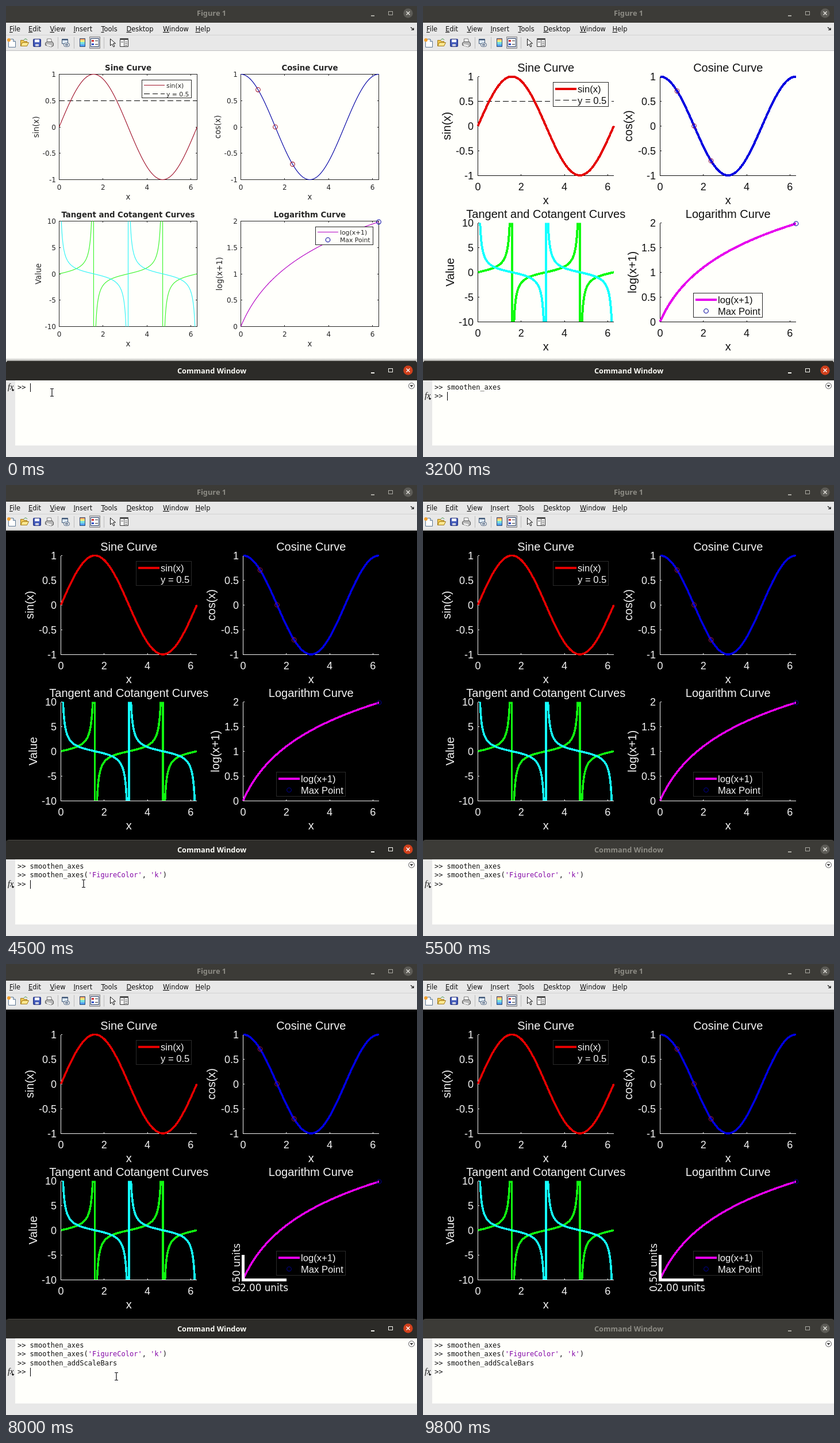
Animation, 715 px wide and 783 px high, one loop 9.9 s. Source, as an HTML page:

```html
<!DOCTYPE html>
<html lang="en">
<head>
<meta charset="utf-8">
<title>Figure 1</title>
<style>
html, body { margin: 0; width: 100%; height: 100%; overflow: hidden; background: #e8e8e8; }
svg { display: block; }
text { white-space: pre; }
.crisp { shape-rendering: crispEdges; }
.bar text { font: 700 12.8px "Noto Sans", sans-serif; text-anchor: middle; }
.bar { --face: #3c3b37; --label: #8c8b84; --glyph: #a9a8a1; --close: #5d5c57; --cross: #e4e3dd; }
.bar.active { --face: #2c2b28; --label: #fbfbf6; --glyph: #f4f4ee; --close: #d0401c; --cross: #fff; }
.menu { font: 11.4px "DejaVu Sans", sans-serif; fill: #111; }
.console { font: 12px "DejaVu Sans Mono", monospace; fill: #111; }
.console .str { fill: #8408a8; }
.fx { font: italic 14px "Liberation Serif", serif; }

.scene { --ink: #262626; --edge: #262626; --paper: #fffffb; --thick: 1.15px; --steep: 1.15px;
  --red: #a0142c; --blue: #0000a4; --green: #3cf52c; --cyan: #30f4f8; --pink: #b400c4; --mark: #a0142c; --spot: #0000a0; }
.pretty { --ink: #101010; --thick: 4px; --steep: 4px;
  --red: #e40000; --blue: #0000e0; --green: #10fa10; --cyan: #14ffff; --pink: #e600ee; --mark: #8c1450; }
.dark { --ink: #f4f4f4; --edge: #2a2a2a; --paper: #000; --thick: 3.6px; --steep: 3.6px; --spot: #00008c; }
.scene text { font-family: "DejaVu Sans", sans-serif; fill: var(--ink); }
.pretty text { font-family: "Liberation Sans", Arial, sans-serif; }
.scene .title, .scene .label { font-size: 13.33px; text-anchor: middle; }
.scene .title { font-weight: 700; }
.scene .tick { font-size: 12px; }
.scene .key { font-size: 10.8px; }
.pretty .title, .pretty .label { font-size: 20px; font-weight: 400; }
.pretty .tick { font-size: 18px; }
.pretty .key { font-size: 16.6px; }
.scene .scale { font: 16.8px "DejaVu Sans", sans-serif; }
.axis { fill: none; stroke: var(--ink); shape-rendering: crispEdges; }
.curve { fill: none; stroke-width: var(--thick); stroke-linejoin: round; }
.pretty .curve { shape-rendering: crispEdges; }
.steep { stroke-width: var(--steep); }
.dash { stroke: #000; stroke-dasharray: 9.5 5; shape-rendering: crispEdges; }
.ring { fill: none; stroke-width: 1.1; }
.legend { fill: var(--paper); stroke: var(--edge); shape-rendering: crispEdges; }
</style>
</head>
<body>
<svg id="stage" width="715" height="783" viewBox="0 0 715 783">
  <defs>
    <g id="buttons" fill="none">
      <path class="crisp" d="M635 17h6" stroke="var(--glyph)" stroke-width="2"/>
      <rect class="crisp" x="665.5" y="9.5" width="7" height="6" stroke="var(--glyph)"/>
      <circle cx="699.5" cy="12.5" r="8.2" fill="var(--close)"/>
      <path d="M696.5 9.5l6 6m0-6l-6 6" stroke="var(--cross)" stroke-width="1.4"/>
    </g>
    <linearGradient id="shade" x2="0" y2="1">
      <stop stop-color="#000" stop-opacity="0"/><stop offset="1" stop-color="#000" stop-opacity=".3"/>
    </linearGradient>
  </defs>

  <rect y="78" width="715" height="1" fill="#fffffb"/>
  <rect id="paper" y="79" width="715" height="540" fill="#fffffb"/>
  <g id="plots"></g>

  <rect y="28" width="715" height="50" fill="#e8e8e8"/>
  <g class="bar">
    <rect width="715" height="29" fill="var(--face)"/>
    <text x="357.5" y="17" fill="var(--label)">Figure 1</text>
    <use href="#buttons"/>
  </g>
  <path class="crisp" d="M0 50.5h715" stroke="#d2d2d2"/>
  <path class="crisp" d="M0 77.5h715" stroke="#c0c0c0"/>
  <g id="menu" class="menu"></g>
  <path d="M704 37l5 4m0-3v3.5h-4" fill="none" stroke="#111" stroke-width="1.2"/>

  <g id="tools" stroke-linejoin="round">
    <path class="crisp" d="M90.5 54v20M118.5 54v20M170.5 54v20" stroke="#bcbcbc"/>
    <path d="M4.5 57.5h8l4 4v10h-12z" fill="#fff" stroke="#5e7894"/>
    <path d="M12.5 57.5v4h4" fill="#dbe6f0" stroke="#5e7894"/>
    <circle cx="5" cy="59" r="3" fill="#f0a030"/>
    <path d="M25.5 69.5v-10h5l1 2h5v8z" fill="#f0c850" stroke="#a07818"/>
    <path d="M25.5 69.5l3-6h11l-3 6z" fill="#ffe890" stroke="#a07818"/>
    <path d="M31 59q3-4 6 0" fill="none" stroke="#409040"/>
    <rect x="47.5" y="57.5" width="13" height="13" rx="1" fill="#4058b8" stroke="#202c78"/>
    <path d="M50 58h8v5h-8z" fill="#f2f4ff"/><path d="M51 66h6v4h-6z" fill="#c8cce0"/>
    <path d="M71.5 63v-6h7l1 6" fill="#fff" stroke="#777"/>
    <path d="M68.5 64l3-2h9l2 3v4l-4 2-10-3z" fill="#b8b8b8" stroke="#555"/>
    <path d="M71 66l8 2v3l-8-2z" fill="#eee"/>
    <path d="M97.5 57.5h10v8h-10z" fill="#dce8f4" stroke="#405878"/>
    <path d="M97.5 58.5h10" stroke="#405878" stroke-width="2"/>
    <rect x="100.5" y="64.5" width="10" height="6" rx="3" fill="#f4f4f4" stroke="#405878"/>
    <path d="M103 67.5h5" stroke="#405878" stroke-width="2"/>
    <path d="M128.5 56.5h9v3h-9z" fill="#f0a060"/><path d="M128.5 59.5h9v3h-9z" fill="#f4f070"/>
    <path d="M128.5 62.5h9v4h-9z" fill="#70e0e0"/><path d="M128.5 66.5h9v4h-9z" fill="#50a0f0"/>
    <rect x="128.5" y="56.5" width="9" height="14" fill="none" stroke="#304870"/>
    <rect x="145.5" y="53.5" width="18" height="20" fill="#cfcfd4" stroke="#858585"/>
    <rect x="147.5" y="56.5" width="14" height="14" fill="#fff" stroke="#304870"/>
    <path d="M149 60.5h4" stroke="#d03030" stroke-width="3"/><path d="M149 66.5h4" stroke="#3050c8" stroke-width="3"/>
    <path d="M155 60.5h5m-5 6h5" stroke="#333"/>
    <path d="M181.5 57v12l3-3 2.5 5 2-1-2.5-5h4z" fill="#fff" stroke="#111"/>
    <rect x="198.5" y="56.5" width="14" height="14" fill="#fff" stroke="#333"/>
    <path d="M198 58h15" stroke="#555" stroke-width="2"/>
    <path d="M205.5 59v11M207 62.5h4m-4 3h4m-4 3h4M200 62.5h4" stroke="#555"/>
  </g>

  <rect id="glow" y="611" width="715" height="5" fill="url(#shade)"/>
  <rect y="650" width="715" height="133" fill="#e8e8e8"/>
  <rect x="16" y="650" width="699" height="113" fill="#fffffb"/>
  <g id="command" class="bar">
    <path d="M0 650v-30q0-4 4-4h707q4 0 4 4v30z" fill="var(--face)"/>
    <path class="crisp" d="M4 616.5h707" stroke="#4a4944"/>
    <text x="358" y="638" fill="var(--label)">Command Window</text>
    <use href="#buttons" y="620"/>
  </g>
  <circle cx="705.5" cy="659.5" r="5" fill="#fff" stroke="#555"/>
  <path d="M702.5 658h6l-3 4z" fill="#444"/>

  <g id="console" class="console">
    <g id="fx"><text class="fx" x="3" y="666">fx</text><path d="M9.5 666h5l-2.5 3z"/></g>
  </g>
  <path id="caret" class="crisp" d="M.5 654.5v15" stroke="#000"/>
  <g id="beam" fill="none">
    <path d="M-3-6.5h6M0-6.5v13M-3 6.5h6" stroke="#fff" stroke-width="3"/>
    <path d="M-3-6.5h2.5L0-6 .5-6.5H3M0-6v12M-3 6.5h2.5L0 6l.5.5H3" stroke="#111" stroke-width="1.2"/>
  </g>
  <path id="arrow" d="M0 0v14l3.5-3 2.5 5.5 2.5-1-2.5-5.5h4.5z" fill="#000" stroke="#fff"/>
</svg>
<script>
const NS = 'http://www.w3.org/2000/svg', TAU = 2 * Math.PI, LOOP = 9900;
const $ = id => document.getElementById(id);

function add(parent, tag, attrs = {}, content = '') {
  const el = parent.appendChild(document.createElementNS(NS, tag));
  for (const k in attrs) el.setAttribute(k, attrs[k]);
  el.textContent = content;
  return el;
}
const show = (el, on) => el.setAttribute('visibility', on ? 'visible' : 'hidden');

const cot = x => 1 / Math.tan(x);
const panels = [
  { title: 'Sine Curve', name: 'sin(x)', lo: -1, hi: 1, step: .5, curves: [['red', Math.sin]], level: .5 },
  { title: 'Cosine Curve', name: 'cos(x)', lo: -1, hi: 1, step: .5, curves: [['blue', Math.cos]],
    rings: [1, 2, 3].map(k => k * TAU / 8), ring: 'mark' },
  { title: 'Tangent and Cotangent Curves', name: 'Value', lo: -10, hi: 10, step: 5, steep: true,
    curves: [['green', Math.tan], ['cyan', cot]] },
  { title: 'Logarithm Curve', name: 'log(x+1)', lo: 0, hi: 2, step: .5, curves: [['pink', Math.log1p]],
    rings: [TAU], ring: 'spot' }
];

const plain = { cls: 'scene', x: [92.5, 408.5], w: 240, y: [118.5, 373.5], h: 183, boxed: true,
  titleUp: 6.5, tickDown: 17, nameDown: 34.5, tickLeft: 5.5, mid: 4.5, names: [57, 373, 61, 375.5],
  keyMid: 4, sample: 36,
  keys: [{ x: 236.5, y: 128.5, w: 86, h: 31, rows: [137.5, 152.5], line: 240, text: 279 },
         { x: 538.5, y: 383.5, w: 100, h: 31, rows: [392.5, 406], line: 542, text: 581 }] };
const pretty = { cls: 'scene pretty', x: [95.5, 412.5], w: 236.5, y: [122.5, 376.5], h: 171.5,
  titleUp: 8.5, tickDown: 25.5, nameDown: 49.5, tickLeft: 7.5, mid: 6.5, names: [47.5, 363.5, 53.5, 370.5],
  keyMid: 6, sample: 37,
  keys: [{ x: 226.5, y: 132.5, w: 96, h: 42, rows: [144, 163.5], line: 229.5, text: 269 },
         { x: 470.5, y: 498.5, w: 120, h: 42, rows: [510, 529.5], line: 474, text: 513 }] };

function curvePath(f, px, py) {
  const n = 1000, pts = [];
  for (let i = 0; i < n; i++) {
    const x = TAU * i / (n - 1), y = Math.max(-40, Math.min(40, f(x)));
    pts.push(px(x).toFixed(2) + ' ' + py(y).toFixed(2));
  }
  return 'M' + pts.join('L');
}

function drawPanel(root, s, p, i) {
  const x = s.x[i % 2], y = s.y[i >> 1], { w, h } = s, bottom = y + h, cx = x + w / 2;
  const px = v => x + v / TAU * w, py = v => bottom - (v - p.lo) / (p.hi - p.lo) * h;
  const axes = add(root, 'g', { class: 'axes' });
  let d = s.boxed ? `M${x} ${y}h${w}v${h}h${-w}z` : `M${x} ${y}v${h}h${w}`;

  for (const v of [0, 2, 4, 6]) {
    d += `M${px(v)} ${bottom}v-2.5` + (s.boxed ? `M${px(v)} ${y}v2.5` : '');
    add(axes, 'text', { class: 'tick', x: px(v), y: bottom + s.tickDown, 'text-anchor': 'middle' }, v);
  }
  for (let v = p.lo; v <= p.hi; v += p.step) {
    d += `M${x} ${py(v)}h2.5` + (s.boxed ? `M${x + w} ${py(v)}h-2.5` : '');
    add(axes, 'text', { class: 'tick', x: x - s.tickLeft, y: py(v) + s.mid, 'text-anchor': 'end' }, v);
  }
  add(axes, 'path', { class: 'axis', d });
  add(axes, 'text', { class: 'label', x: cx, y: bottom + s.nameDown }, 'x');
  add(axes, 'text', { class: 'label', transform: `translate(${s.names[i]} ${y + h / 2}) rotate(-90)` }, p.name);
  add(root, 'text', { class: 'title', x: cx, y: y - s.titleUp }, p.title);

  if (p.level) add(root, 'path', { class: 'dash', d: `M${x} ${py(p.level)}h${w}` });
  const area = p.steep
    ? add(root, 'svg', { x, y, width: w, height: h, viewBox: `${x} ${y} ${w} ${h}`, overflow: 'hidden' }) : root;
  for (const [color, f] of p.curves)
    add(area, 'path', { class: p.steep ? 'curve steep' : 'curve', stroke: `var(--${color})`, d: curvePath(f, px, py) });
  for (const v of p.rings || []) ring(root, px(v), py(p.curves[0][1](v)), p.ring);
  return axes;
}

function ring(root, cx, cy, color) {
  add(root, 'circle', { class: 'ring', cx, cy, r: 3.8, stroke: `var(--${color})` });
}

function drawLegend(root, s, k, color, names) {
  add(root, 'rect', { class: 'legend', x: k.x, y: k.y, width: k.w, height: k.h });
  names.forEach((name, i) => add(root, 'text', { class: 'key', x: k.text, y: k.rows[i] + s.keyMid }, name));
  add(root, 'path', { class: 'curve', stroke: `var(--${color})`, d: `M${k.line} ${k.rows[0]}h${s.sample}` });
}

function drawScene(s) {
  const root = add($('plots'), 'g', { class: s.cls });
  const axes = panels.map((p, i) => drawPanel(root, s, p, i));
  const [a, b] = s.keys;
  drawLegend(root, s, a, 'red', ['sin(x)', 'y = 0.5']);
  add(root, 'path', { class: 'dash', d: `M${a.line} ${a.rows[1]}h${s.sample}` });
  drawLegend(root, s, b, 'pink', ['log(x+1)', 'Max Point']);
  ring(root, b.line + s.sample / 2, b.rows[1], 'spot');
  return { root, logAxes: axes[3] };
}

const first = drawScene(plain), second = drawScene(pretty);
const scale = add(second.root, 'g');
add(scale, 'path', { d: 'M412 505v43.5M409.5 548h78', stroke: '#fff', 'stroke-width': 5, fill: 'none', class: 'crisp' });
add(scale, 'text', { class: 'scale', x: 407, y: 568 }, '2.00 units');
add(scale, 'text', { class: 'scale', transform: 'translate(407 569) rotate(-90)' }, '0.50 units');

// Menu entries: the first letter is underlined.
[['File', 6], ['Edit', 39], ['View', 76.5], ['Insert', 117.5], ['Tools', 165.5],
 ['Desktop', 209.5], ['Window', 273], ['Help', 329.5]].forEach(([word, x]) => {
  const t = add($('menu'), 'text', { x, y: 44 });
  t.innerHTML = `<tspan text-decoration="underline">${word[0]}</tspan>${word.slice(1)}`;
});

const ROW = 15.4;
const commands = ['smoothen_axes', `smoothen_axes('FigureColor', 'k')`, 'smoothen_addScaleBars'];
const typedAt = [600, 3700, 7100], promptAt = [0, 1000, 4500, 8000];
const line = (x, row, text) => add($('console'), 'text', { x, y: 666 + Math.round(row * ROW) }, text);
const prompts = promptAt.map((_, i) => line(20, i, '>>'));
const lines = commands.map((c, i) => {
  const t = line(41.6, i, '');
  t.innerHTML = c.replace(/'\w+'/g, '<tspan class="str">$&</tspan>');
  return t;
});

// Timelines: each entry holds from its time until the next one.
const rowKeys = [[0, 0], [800, 1], [4400, 2], [7800, 3]];
const activeKeys = [[0, 1], [1900, 0], [3200, 1], [5500, 0], [6700, 1], [9800, 0]];
const column = n => Math.round(42.3 + 7.225 * n);
const caretKeys = [[0, column(0)], [600, column(13)], [800, 20], [1000, column(0)], [1400, 0],
  [3200, column(0)], [3700, column(33)], [4200, 0], [4400, 20], [4500, column(0)], [4900, 0],
  [6700, column(0)], [7100, column(21)], [7600, 0], [7800, 20], [8000, column(0)], [8400, 0],
  [9000, column(0)], [9400, 0]];
const beamKeys = [[0, 80, 671], [1200, 80, 668], [1300],
  [3300, 128, 668], [3400, 134, 686], [3500, 135, 692], [4900, 134, 691], [5100, 124, 681], [5200],
  [6800, 186, 702], [6900, 192, 716], [9000, 195, 725], [9100, 176, 672], [9200]];
const arrowKeys = [[0], [9200, 140, 420], [9300, 112, 112], [9400]];
const at = (keys, t) => keys.filter(k => k[0] <= t).pop();

function place(id, [, x, y]) {
  show($(id), x);
  if (x) $(id).setAttribute('transform', `translate(${x} ${y})`);
}

function frame() {
  const t = performance.now() % LOOP;
  const dark = t >= 4500, scaled = t >= 8000, row = at(rowKeys, t)[1], active = at(activeKeys, t)[1];
  const dy = Math.round(row * ROW);

  first.root.style.display = t < 900 ? '' : 'none';
  second.root.style.display = t < 900 ? 'none' : '';
  second.root.classList.toggle('dark', dark);
  $('paper').setAttribute('fill', dark ? '#000' : '#fffffb');
  show(second.logAxes, !scaled);
  show(scale, scaled);

  $('command').classList.toggle('active', !!active);
  $('glow').setAttribute('opacity', active ? 1 : .5);
  prompts.forEach((el, i) => show(el, t >= promptAt[i]));
  lines.forEach((el, i) => show(el, t >= typedAt[i]));
  $('fx').setAttribute('transform', `translate(0 ${dy})`);
  const [time, x] = at(caretKeys, t);
  place('caret', [time, x, dy]);
  place('beam', at(beamKeys, t));
  place('arrow', at(arrowKeys, t));
  requestAnimationFrame(frame);
}
frame();
</script>
</body>
</html>
```
